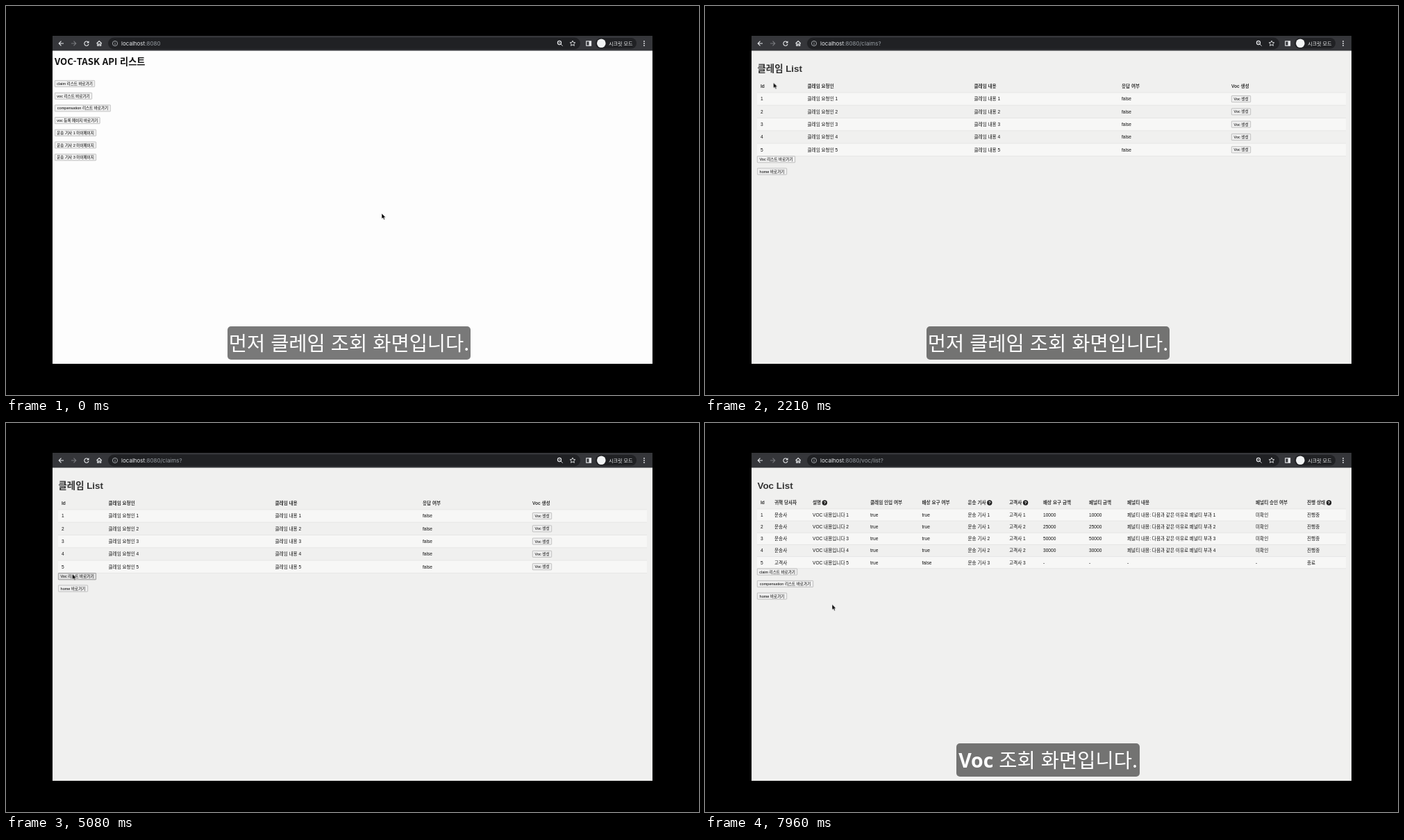
Write an HTML page that moves like this. It is 998 px wide and 561 px high and loops after 8000 ms.

```html
<!DOCTYPE html>
<html lang="ko">
<head>
<meta charset="utf-8">
<title>VOC-TASK</title>
<style>
  html, body { margin: 0; width: 100%; height: 100%; overflow: hidden; background: #000; }
  svg { display: block; width: 998px; height: 561px; }
  text { font-family: "Liberation Sans", "Noto Sans CJK KR", "Noto Sans CJK", sans-serif; fill: #222; white-space: pre; }
  .cjk { font-family: "Noto Sans CJK KR", "Noto Sans CJK", sans-serif; }
  .url { font: 8px Inter, "Noto Sans", sans-serif; fill: #9aa0a6; }
  .host { fill: #e8eaed; }
  .title { font-size: 13.4px; font-weight: bold; fill: #333; }
  .cell { font-size: 6.6px; fill: #111; }
  .head { font-weight: bold; fill: #333; }
  .button text { font-size: 5.55px; fill: #000; text-anchor: middle; }
  .button rect { fill: #efefef; stroke: #a2a2a2; stroke-width: .6; }
  .button .over { fill: #dfdfdf; stroke: #777; }
  .icon { fill: none; stroke: #e8eaed; stroke-width: 1.1; }
  .caption rect { fill: #000; fill-opacity: .52; }
  .caption text { font-size: 28.5px; font-weight: 500; fill: #fff; text-anchor: middle; }
  .latin { font-family: "Noto Sans", sans-serif; font-weight: 600; }

  .timed { animation: 8s step-end infinite; }
  #home { animation-name: home; }
  #claims { animation-name: claims; }
  #vocs { animation-name: vocs; }
  #firstCaption { animation-name: firstCaption; }
  #secondCaption { animation-name: secondCaption; }
  #reload { animation-name: reload; }
  #stop { animation-name: stop; }
  #claimOver { animation-name: claimOver; }
  #vocOver { animation-name: vocOver; }
  #cursor { animation: move 8s linear infinite; }

  @keyframes home { 0% { opacity: 1 } 26.5%, 100% { opacity: 0 } }
  @keyframes claims { 0% { opacity: 0 } 26.5% { opacity: 1 } 66.25%, 100% { opacity: 0 } }
  @keyframes vocs { 0% { opacity: 0 } 66.25%, 100% { opacity: 1 } }
  @keyframes firstCaption { 0% { opacity: 1 } 31.25%, 100% { opacity: 0 } }
  @keyframes secondCaption { 0% { opacity: 0 } 72.5%, 100% { opacity: 1 } }
  @keyframes reload { 0% { opacity: 1 } 24% { opacity: 0 } 26.5% { opacity: 1 } 64.75% { opacity: 0 } 66.25%, 100% { opacity: 1 } }
  @keyframes stop { 0% { opacity: 0 } 24% { opacity: 1 } 26.5% { opacity: 0 } 64.75% { opacity: 1 } 66.25%, 100% { opacity: 0 } }
  @keyframes claimOver { 0% { opacity: 0 } 18.5%, 100% { opacity: 1 } }
  @keyframes vocOver { 0% { opacity: 0 } 59.5%, 100% { opacity: 1 } }
  @keyframes move {
    0% { transform: translate(541px, 299px); animation-timing-function: cubic-bezier(.4, 0, .5, 1) }
    8.875% { transform: translate(235.5px, 300.5px); animation-timing-function: ease-in-out }
    20% { transform: translate(98.5px, 110.5px) }
    50% { transform: translate(98.5px, 110.5px); animation-timing-function: ease-in-out }
    61.5%, 86% { transform: translate(95.5px, 217.5px); animation-timing-function: ease-in-out }
    96%, 100% { transform: translate(183px, 261.5px) }
  }
</style>
</head>
<body>
<svg viewBox="0 0 998 561">
  <rect width="998" height="561"/>
  <rect x="67" y="43" width="864" height="22" fill="#35363a"/>
  <rect x="147" y="45.5" width="680" height="17" rx="8.5" fill="#202124"/>
  <rect x="849" y="46" width="59" height="15.5" rx="7.75" fill="#202124"/>

  <g class="icon">
    <path d="M83 54H76.5M79.5 50.7L76.2 54L79.5 57.3"/>
    <path d="M94 54H100.5M97.5 50.7L100.8 54L97.5 57.3" stroke="#77787c"/>
    <path id="stop" class="timed" d="M113 51L119 57M119 51L113 57"/>
    <g id="reload" class="timed">
      <path d="M118.4 52.2A3.1 3.1 0 1 0 119 54.8"/>
      <path d="M119.5 50.2V53.5H116.2Z" fill="#e8eaed" stroke="none"/>
    </g>
    <path d="M130.6 54L134.2 50.6L137.8 54M131.7 53.3V57.2H133.3V54.8H135.1V57.2H136.7V53.3"/>
    <g stroke="#bdc1c6" stroke-width=".8">
      <circle cx="157" cy="54" r="3.6"/>
      <path d="M157 53.5V56M157 51.8V52.6"/>
    </g>
    <circle cx="797" cy="53" r="2.6"/>
    <path d="M799 55L801.7 57.7M795.8 53H798.2" stroke-width=".9"/>
    <path d="M816 50L817.1 52.5L819.8 52.8L817.8 54.6L818.4 57.3L816 55.9L813.6 57.3L814.2 54.6L812.2 52.8L814.9 52.5Z" stroke-width=".9"/>
    <rect x="835.8" y="50.8" width="6.8" height="6.4"/>
    <path d="M841 50.8V57.2" stroke-width="3"/>
  </g>
  <circle cx="857.3" cy="53.8" r="6.3" fill="#f1f3f4"/>
  <text class="cjk" x="868" y="56.5" font-size="7.1" style="fill:#f1f3f4">시크릿 모드</text>
  <g fill="#e8eaed">
    <circle cx="919" cy="51" r=".9"/><circle cx="919" cy="54" r=".9"/><circle cx="919" cy="57" r=".9"/>
  </g>

  <g id="home" class="timed"></g>
  <g id="claims" class="timed"></g>
  <g id="vocs" class="timed"></g>

  <g id="firstCaption" class="caption timed">
    <rect x="319" y="462" width="350" height="48" rx="5"/>
    <text class="cjk" x="494" y="497">먼저 클레임 조회 화면입니다.</text>
  </g>
  <g id="secondCaption" class="caption timed">
    <rect x="362" y="462" width="264" height="48" rx="5"/>
    <text class="cjk" x="494" y="497"><tspan class="latin">Voc</tspan> 조회 화면입니다.</text>
  </g>

  <path id="cursor" d="M0 0V8L1.9 6.4L3.2 9.2L4.6 8.6L3.4 5.9H5.8Z" stroke="#fff" stroke-width=".6"/>
</svg>
<script>
  const text = (x, y, label, cls) => `<text x="${x}" y="${y}" class="${cls}">${label}</text>`;

  const button = (x, middle, width, label, overId) => {
    const box = attrs => `<rect x="${x + .3}" y="${middle - 4.6}" width="${width - .6}" height="9.2" rx=".8" ${attrs}/>`;
    return `<g class="button">${box("")}${overId ? box(`id="${overId}" class="over timed"`) : ""}
      ${text(x + width / 2, middle + 2, label, "")}</g>`;
  };

  const page = (path, color) => `<rect x="67" y="64.5" width="864" height="451.5" fill="${color}"/>
    <text x="166" y="56.6" class="url"><tspan class="host">localhost</tspan>:8080${path}</text>`;

  const help = (x, y) => `<circle cx="${x}" cy="${y}" r="3.7" fill="#222"/>
    <text x="${x}" y="${y + 2.2}" font-size="6.2" font-weight="bold" text-anchor="middle" style="fill:#fff">?</text>`;

  // Each column is [x, heading, row => content]; content may be text or ready markup.
  const table = (columns, headMiddle, top, step) => {
    let out = columns.map(([x, heading]) => text(x, headMiddle + 2.4, heading, "cell head")).join("");
    for (let row = 0; row < 5; row++) {
      const y = top + row * step;
      const middle = y + step / 2;
      if (row % 2 === 0) out += `<rect x="75" y="${y}" width="848" height="${step}" fill="#f7f7f6"/>`;
      out += `<path d="M75 ${y}H923" stroke="#dcdcdc" stroke-width=".6"/>`;
      for (const [x, , content] of columns) {
        const value = String(content(row, middle));
        out += value.startsWith("<") ? value : text(x, middle + 2.4, value, "cell");
      }
    }
    const bottom = top + 5 * step;
    return out + `<path d="M75 ${bottom}H923" stroke="#dcdcdc" stroke-width=".6"/>`;
  };

  const numbered = label => row => `${label} ${row + 1}`;
  const id = [80, "Id", row => row + 1];
  const pick = (...values) => row => values[row];
  const openOnly = (value, closed) => row => row < 4 ? value : closed;
  const show = (name, markup) => document.getElementById(name).innerHTML = markup;

  const links = [
    ["claim 리스트 바로가기", 58], ["voc 리스트 바로가기", 54],
    ["compensation 리스트 바로가기", 81], ["voc 등록 페이지 바로가기", 65.5],
    ...[1, 2, 3].map(n => [`운송 기사 ${n} 마이페이지`, 60])
  ];
  show("home", page("", "#fdfdfd")
    + `<text x="70" y="85.4" class="cjk" font-size="13.2" font-weight="bold" style="fill:#111">VOC-TASK API 리스트</text>`
    + links.map(([label, width], i) => button(70, 112 + i * 17.7, width, label, i ? "" : "claimOver")).join(""));

  show("claims", page("/claims?", "#f0f0ef")
    + text(75.5, 94.6, "클레임 List", "title")
    + table([
      id,
      [147.5, "클레임 요청인", numbered("클레임 요청인")],
      [387.5, "클레임 내용", numbered("클레임 내용")],
      [600, "응답 여부", () => "false"],
      [758, "Voc 생성", (row, middle) => button(758, middle, 28, "Voc 생성")]
    ], 116, 124.9, 18.3)
    + button(75, 221.2, 55, "Voc 리스트 바로가기", "vocOver")
    + button(75, 238.6, 43, "home 바로가기"));

  show("vocs", page("/voc/list?", "#f0f0ef")
    + text(75.5, 94.6, "Voc List", "title")
    + table([
      id,
      [100, "귀책 당사자", openOnly("운송사", "고객사")],
      [155, "설명", numbered("VOC 내용입니다")],
      [238, "클레임 인입 여부", () => "true"],
      [312.5, "배상 요구 여부", openOnly("true", "false")],
      [378.5, "운송 기사", row => `운송 기사 ${1 + (row >> 1)}`],
      [438, "고객사", row => `고객사 ${row < 4 ? 1 + row % 2 : 3}`],
      [487, "배상 요구 금액", pick(10000, 25000, 50000, 30000, "-")],
      [553, "페널티 금액", pick(10000, 25000, 50000, 30000, "-")],
      [608, "페널티 내용", row => row < 4 ? `페널티 내용: 다음과 같은 이유로 페널티 부과 ${row + 1}` : "-"],
      [793, "페널티 승인 여부", openOnly("미확인", "-")],
      [867, "진행 상태", openOnly("진행중", "종료")]
    ], 115, 124, 17.15)
    + [172.3, 409.8, 461.6, 898.5].map(x => help(x, 115)).join("")
    + button(75, 214.6, 58, "claim 리스트 바로가기")
    + button(75, 232, 81, "compensation 리스트 바로가기")
    + button(75, 249.6, 43, "home 바로가기"));
</script>
</body>
</html>
```
